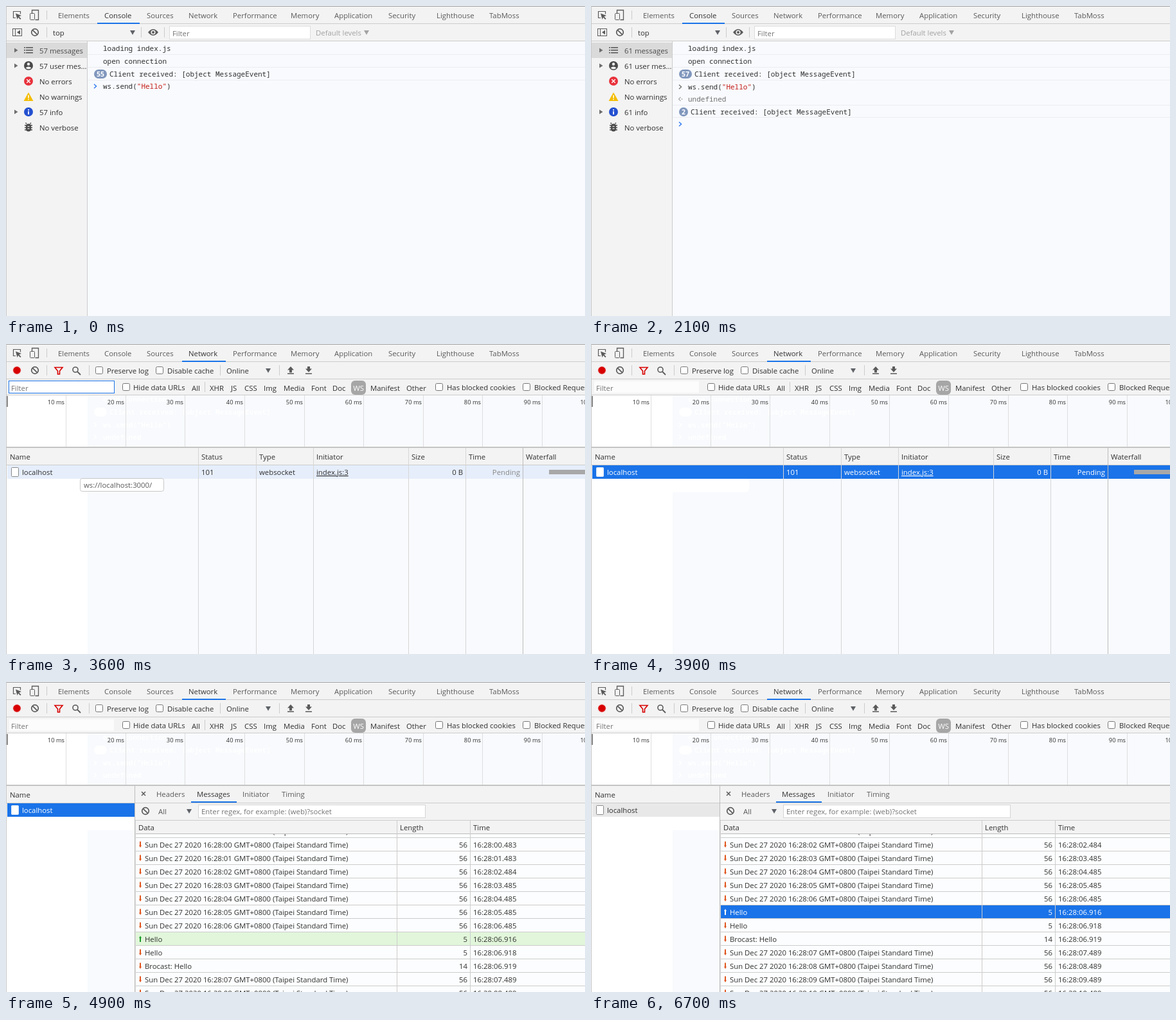
Write an HTML page that moves like this. It is 901 px wide and 483 px high and loops after 6800 ms.

```html
<!DOCTYPE html>
<html lang="en">
<head>
<meta charset="utf-8">
<title>Developer tools: socket messages</title>
<style>
html, body { margin: 0; width: 100%; height: 100%; overflow: hidden; background: #f8fafd; }
svg { display: block; }
text { font: 11.35px "Open Sans", "Noto Sans", sans-serif; white-space: pre; }
.mono { font: 11px "Noto Sans Mono", "DejaVu Sans Mono", monospace; }
.trace { font-weight: 700; }
.tiny { font-size: 9.3px; }
.badge { font-weight: 700; font-size: 10.5px; }
</style>
</head>
<body>
<svg id="stage" width="901" height="483" viewBox="0 0 901 483"></svg>
<script>
const LOOP = 6800;
const BAR = '#f3f3f3', LINE = '#cccccc', INK = '#303030', SOFT = '#5a5a5a', BLUE = '#1a73e8', TINT = '#f8fafd';
const stage = document.getElementById('stage');

// Drawing helpers, each returns SVG markup
const rect = (x, y, w, h, fill, extra = '') =>
  `<rect x="${x}" y="${y}" width="${w}" height="${h}" fill="${fill}" ${extra}/>`;
const frame = (x, y, w, h, stroke, fill = '#fff', r = 0) =>
  rect(x + .5, y + .5, w - 1, h - 1, fill, `stroke="${stroke}" rx="${r}"`);
const hline = (x, y, w, c = LINE) => rect(x, y, w, 1, c);
const vline = (x, y, h, c = LINE) => rect(x, y, 1, h, c);
const text = (x, y, s, fill = INK, cls = '', extra = '') =>
  `<text x="${x}" y="${y}" fill="${fill}" class="${cls}" ${extra}>${s}</text>`;
const right = (x, y, s, fill = INK, cls = '') => text(x, y, s, fill, cls, 'text-anchor="end"');
const mid = (x, y, s, fill = INK, cls = '') => text(x, y, s, fill, cls, 'text-anchor="middle"');
const mono = (x, y, s, fill = INK) => text(x, y, s, fill, 'mono');
const trace = (x, y, s) => text(x, y, s, '#fff', 'mono trace');
const fillPath = (d, c) => `<path d="${d}" fill="${c}"/>`;
const stroke = (d, c, w = 1.5) => `<path d="${d}" fill="none" stroke="${c}" stroke-width="${w}"/>`;
const circle = (x, y, r, fill, extra = '') => `<circle cx="${x}" cy="${y}" r="${r}" fill="${fill}" ${extra}/>`;
const down = (x, y, c = '#5f6368') => fillPath(`M${x - 4} ${y - 3}h8l-4 7z`, c);
const ban = (x, y) => circle(x, y, 5.3, 'none', 'stroke="#5a5a5a" stroke-width="1.7"') +
  stroke(`M${x - 3.7} ${y - 3.7}l7.4 7.4`, '#5a5a5a', 1.7);
const checkbox = (x, y) => frame(x, y, 12, 12, '#767676', '#fff', 2);
const passed = (t, steps) => steps.filter(s => t >= s).length;
const within = (t, a, b) => t >= a && t < b;

const TABS = [['Elements', 81], ['Console', 153], ['Sources', 219], ['Network', 284], ['Performance', 353],
  ['Memory', 443], ['Application', 511], ['Security', 595], ['Lighthouse', 670], ['TabMoss', 752]];

function topBar(active, hover) {
  let s = rect(0, 0, 901, 55, BAR) + hline(0, 27, 901) + hline(0, 54, 901);
  if (hover) s += rect(274, 2, 68, 25, '#e6e6e6');
  s += hline(0, 0, 901, '#a3a3a3');
  s += stroke('M15 18.5h-3.5v-10h11v4', SOFT, 1.2) + fillPath('M15 11.5l9 3.5-3.7 1.5 3.2 3.2-1.3 1.3-3.2-3.2-1.5 3.2z', SOFT);
  s += stroke('M40.5 11v-4.5h10v15h-5', SOFT, 1.3) + frame(37, 11, 8, 11, SOFT, BAR, 1);
  s += vline(63, 7, 14);
  for (const [name, x] of TABS) s += text(x, 19, name, name === active ? '#333' : SOFT);
  return s + (active === 'Console' ? rect(142, 26, 66, 2, BLUE) : rect(274, 26, 68, 2, BLUE));
}

function sideBar(count) {
  let s = rect(1, 55, 125, 428, BAR) + rect(1, 57, 125, 24, '#dadada') + vline(126, 55, 428);
  const rows = [count + ' messages', count + ' user mes...', 'No errors', 'No warnings', count + ' info', 'No verbose'];
  rows.forEach((label, i) => {
    const y = 69 + 24 * i;
    s += text(52, y + 5, label, i ? INK : '#4a4a4a');
    if ([0, 1, 4].includes(i)) s += fillPath(`M13 ${y - 3.5}l5.5 3.5-5.5 3.5z`, '#6e6e6e');
  });
  for (const y of [65, 69, 73]) s += rect(28, y - 1, 2, 1.6, SOFT) + rect(31, y - 1, 11, 1.6, SOFT);
  s += circle(35, 93, 7, '#4a4a4a') + circle(35, 90.5, 2.2, BAR) + fillPath('M30.5 96.5q4.5-4 9 0q-4.5 4-9 0z', BAR);
  s += circle(35, 117, 7, '#e8323c') + stroke('M32.3 114.3l5.4 5.4m0-5.4l-5.4 5.4', '#fff', 1.5);
  s += fillPath('M35 134.5l7.5 13.5h-15z', '#f4bd00') + rect(34.2, 139, 1.6, 4.5, '#fff') + rect(34.2, 144.7, 1.6, 1.6, '#fff');
  s += circle(35, 165, 7, '#2450d0') + rect(34.1, 161, 1.8, 1.8, '#fff') + rect(34.1, 164, 1.8, 5, '#fff');
  s += stroke('M29 186h12m-12 3.5h12m-12 3.5h12m-9-9.5l-1.5-1.5m7 1.5l1.5-1.5', '#4a4a4a', 1.5) +
    rect(31, 183.5, 8, 12, '#4a4a4a', 'rx="4"') + rect(33.5, 187, 3, 1.2, BAR) + rect(33.5, 190.5, 3, 1.2, BAR);
  return s;
}

const COMMAND = 'ws.send(<tspan fill="#c41a16">"Hello"</tspan>)';
const RECEIVED = 'Client received: [object MessageEvent]';
const chevron = (y, c) => stroke(`M137 ${y - 3.2}l3.5 3.2-3.5 3.2`, c, 1.5);

function received(y, n) {
  if (n < 2) return mono(151, y, RECEIVED);
  const w = n > 9 ? 20 : 14;
  return rect(137, y - 11, w, 14, '#8097bd', 'rx="7"') + mid(137 + w / 2, y, n, '#fff', 'badge') +
    mono(141 + w, y, RECEIVED);
}

function consolePanel(t) {
  const caret = (x, y) => vline(x, y, 14, '#202020');
  const sent = t >= 1500;
  const replies = passed(t, [1600, 1700, 2200]);
  let s = rect(0, 0, 901, 483, TINT) + topBar('Console', t >= 2600);
  s += sideBar(57 + passed(t, [500, 1200]) + replies);
  s += frame(10, 35, 15, 12, SOFT, BAR) + vline(14, 36, 10, SOFT) + fillPath('M22 37.5v7l-5-3.5z', SOFT);
  s += ban(45, 41) + vline(63, 33, 16) + text(73, 46, 'top') + down(197, 41) + vline(210, 33, 16);
  s += fillPath('M221 41q8-10 16 0q-8 10-16 0z', SOFT) + circle(229, 41, 3.6, BAR) + circle(229, 41, 2, SOFT);
  s += vline(246, 33, 16) + frame(254, 31, 220, 21, '#dcdcdc') + text(259, 47, 'Filter', '#757575');
  s += text(482, 46, 'Default levels', '#a3a3a3') + down(561, 41, '#a3a3a3');

  for (const y of [75, 95, 115]) s += hline(127, y, 774, '#ebedf0');
  s += mono(151, 70, 'loading index.js') + mono(151, 90, 'open connection');
  s += received(110, 55 + passed(t, [500, 1200]));
  if (!sent) {
    s += chevron(125, '#367cf1') + mono(151, 129, COMMAND);
    return s + (within(t, 500, 1000) ? caret(257, 118) : '');
  }
  s += chevron(126, '#777') + mono(151, 130, COMMAND);
  s += stroke('M139.5 142l-3 3 3 3', '#aaa', 1.2) + circle(141.5, 145, .9, '#aaa') + mono(151, 149, 'undefined', '#727272');
  s += hline(127, 154, 774, '#ebedf0');
  if (replies) s += received(169, replies) + hline(127, 173, 774, '#ebedf0');
  const y = replies ? 184 : 164;
  s += chevron(y, '#367cf1');
  return s + (t < 2100 || t >= 2500 ? caret(151, y - 7) : '');
}

const KINDS = [['All', 289], ['XHR', 317], ['JS', 350], ['CSS', 371], ['Img', 401], ['Media', 432], ['Font', 475],
  ['Doc', 508], ['Manifest', 567], ['Other', 623]];

function networkTools(t) {
  let s = topBar('Network');
  s += circle(17, 41, 7, '#f4dede') + circle(17, 41, 5.8, '#d80000') + ban(45, 41) + vline(63, 33, 16);
  s += stroke('M76 36.5h12l-4.5 5.5v5h-3v-5z', '#d80000', 1.6);
  s += circle(108, 40, 4, 'none', 'stroke="#5a5a5a" stroke-width="1.6"') + stroke('M111 43l5 5', SOFT, 1.8) + vline(129, 33, 16);
  s += checkbox(139, 35) + text(157, 46, 'Preserve log') + checkbox(233, 35) + text(251, 46, 'Disable cache');
  s += vline(333, 33, 16) + text(343, 46, 'Online') + down(408, 41) + vline(425, 33, 16);
  s += fillPath('M443 35l5 5.5h-3v4h-4v-4h-3zM438 45.5h10v1.5h-10z', SOFT);
  s += fillPath('M471 44l5-5.5h-3v-3.5h-4v3.5h-3zM466 45.5h10v1.5h-10z', SOFT);

  s += rect(0, 55, 901, 24, BAR) + hline(0, 79, 901);
  s += t < 3700 ? frame(4, 57, 165, 20, BLUE) : rect(5, 58, 163, 18, '#fcfcfc');
  s += text(8, 73, 'Filter', '#757575');
  if (t < 3500) s += vline(8, 60, 15, '#202020');
  s += checkbox(181, 61) + text(198, 72, 'Hide data URLs') + vline(309, 59, 16);
  for (const [name, x] of KINDS) s += text(x, 73, name);
  s += rect(537, 57, 23, 22, '#a6a6a6', 'rx="6"') + mid(548.5, 73, 'WS', '#fff');
  s += checkbox(668, 61) + text(686, 72, 'Has blocked cookies') + checkbox(804, 61) + text(822, 72, 'Blocked Requests');
  return s;
}

function overview() {
  // Faint white traces of the earlier view
  let s = rect(137, 99, 20, 14, '#fff', 'rx="7"') + trace(151, 90, 'open connection') + trace(161, 110, RECEIVED) +
    chevron(126, '#fff') + trace(151, 130, 'ws.send("Hello")') + chevron(145, '#fff') + trace(151, 149, 'undefined');
  for (let i = 1; i <= 10; i++) {
    const x = Math.round(i * 92.65 + .28);
    s += vline(x, 80, 80, '#dedede') + right(x - 2, 94, i * 10 + ' ms', INK, 'tiny');
  }
  return s + rect(1, 81, 2, 17, '#8a8a8a') + rect(0, 160, 901, 2, '#c4c4c4');
}

function nameRow(w, bg, ink) {
  const chosen = ink === '#fff';
  return rect(2, 189, w, 21, bg) + frame(8, 192, 12, 15, chosen ? '#dbe8fb' : '#8a8a8a', '#fff', 1) + text(25, 204, 'localhost', ink);
}

function requestTable(t) {
  const chosen = t >= 3700, ink = chosen ? '#fff' : INK;
  const columns = [['Status', 299], ['Type', 389], ['Initiator', 478], ['Size', 626], ['Time', 715], ['Waterfall', 804]];
  let s = rect(1, 162, 900, 26, BAR) + hline(0, 188, 901) + text(6, 180, 'Name');
  s += nameRow(899, chosen ? BLUE : t >= 3300 ? '#e6eefb' : '#f4f4f4', ink);
  for (const [name, x] of columns) s += vline(x, 162, 321, '#d6d6d6') + text(x + 5, 180, name);
  s += vline(804, 162, 321, '#bdbdbd');
  s += text(304, 204, '101', ink) + text(394, 204, 'websocket', ink) + text(483, 204, 'index.js:3', ink, '', 'text-decoration="underline"');
  s += right(711, 204, '0 B', ink) + right(800, 204, 'Pending', chosen ? ink : '#888') + rect(845, 196, 56, 7, '#a8a8a8');
  const tip = [0, .35, .7, 1, .7, .35, 0][Math.floor((t - 3300) / 100)] || 0;
  if (tip) s += `<g opacity="${tip}">` + frame(115, 209, 131, 21, '#c8c8c8', '#fff', 3) + text(121, 224, 'ws://localhost:3000/', SOFT) + '</g>';
  return s;
}

const pad = n => String(n).padStart(2, '0');
function tickRow(sec) {
  const clock = `16:${sec < 0 ? 27 : 28}:${pad((sec + 60) % 60)}`;
  const ms = sec < 2 ? 483 : sec < 3 ? 484 : sec < 7 ? 485 : 489;
  return [`Sun Dec 27 2020 ${clock} GMT+0800 (Taipei Standard Time)`, 56, `${clock}.${ms}`];
}
const BEFORE = 10;
const MESSAGES = [
  ...Array.from({ length: BEFORE }, (_, i) => tickRow(i - 3)),
  ['Hello', 5, '16:28:06.916'], ['Hello', 5, '16:28:06.918'], ['Brocast: Hello', 14, '16:28:06.919'],
  ...Array.from({ length: 6 }, (_, i) => tickRow(i + 7))
];

function messagePanel(t) {
  const picked = t >= 5500;
  const sentTop = 411 - 21 * passed(t, [4900, 5800, 6700]);
  let s = rect(1, 162, 199, 26, BAR) + hline(0, 188, 200) + text(6, 180, 'Name');
  s += nameRow(198, picked ? '#e8e8e8' : BLUE, picked ? INK : '#fff');
  s += rect(201, 162, 700, 321, '#fcfdfe');
  MESSAGES.forEach(([data, length, time], i) => {
    const y = sentTop + 21 * (i - BEFORE);
    if (y < 216 || y > 483) return;
    const sent = i === BEFORE, hot = sent && picked, ink = hot ? '#fff' : INK;
    if (sent) s += rect(202, y, 699, 20, hot ? BLUE : '#e1f6da');
    s += hline(202, y + 20, 699);
    s += sent ? fillPath(`M209 ${y + 5.5}l2 3.5h-1v6h-2v-6h-1z`, hot ? '#fff' : '#1d9a2b')
      : fillPath(`M209 ${y + 15}l2-3.5h-1v-6h-2v6h-1z`, '#e0561f');
    s += text(216, y + 15, data, ink) + right(718, y + 15, length, ink) + text(727, y + 15, time, ink);
  });
  s += rect(201, 162, 700, 74, BAR) + hline(201, 188, 700) + hline(201, 215, 700) + hline(201, 236, 700, '#bdbdbd');
  s += vline(608, 216, 267) + vline(722, 216, 267) + vline(200, 162, 321, '#bdbdbd') + vline(201, 216, 267, '#dcdcdc');
  s += stroke('M211 171l6 6m0-6l-6 6', SOFT, 1.5);
  for (const [name, x] of [['Headers', 234], ['Messages', 297], ['Initiator', 368], ['Timing', 429]])
    s += text(x, 179, name, name === 'Messages' ? '#333' : SOFT);
  s += rect(288, 186, 71, 2, BLUE) + ban(217, 201) + text(237, 206, 'All', SOFT) + down(285, 201);
  s += frame(299, 191, 354, 21, '#d4d4d4') + text(304, 206, 'Enter regex, for example: (web)?socket', '#757575');
  return s + text(206, 231, 'Data') + text(613, 231, 'Length') + text(727, 231, 'Time');
}

function networkPanel(t) {
  let s = rect(0, 0, 901, 483, TINT) + rect(1, 80, 126, 403, '#fff');
  if (t >= 3900) s += rect(115, 209, 131, 22, '#fff', 'rx="6"');
  return s + networkTools(t) + overview() + (t < 4000 ? requestTable(t) : messagePanel(t));
}

let shown = '';
function draw() {
  const t = performance.now() % LOOP;
  const view = (t < 2900 ? consolePanel(t) : networkPanel(t)) + vline(0, 0, 483, '#c8c8c8');
  if (view !== shown) stage.innerHTML = shown = view;
  requestAnimationFrame(draw);
}
draw();
</script>
</body>
</html>
```
